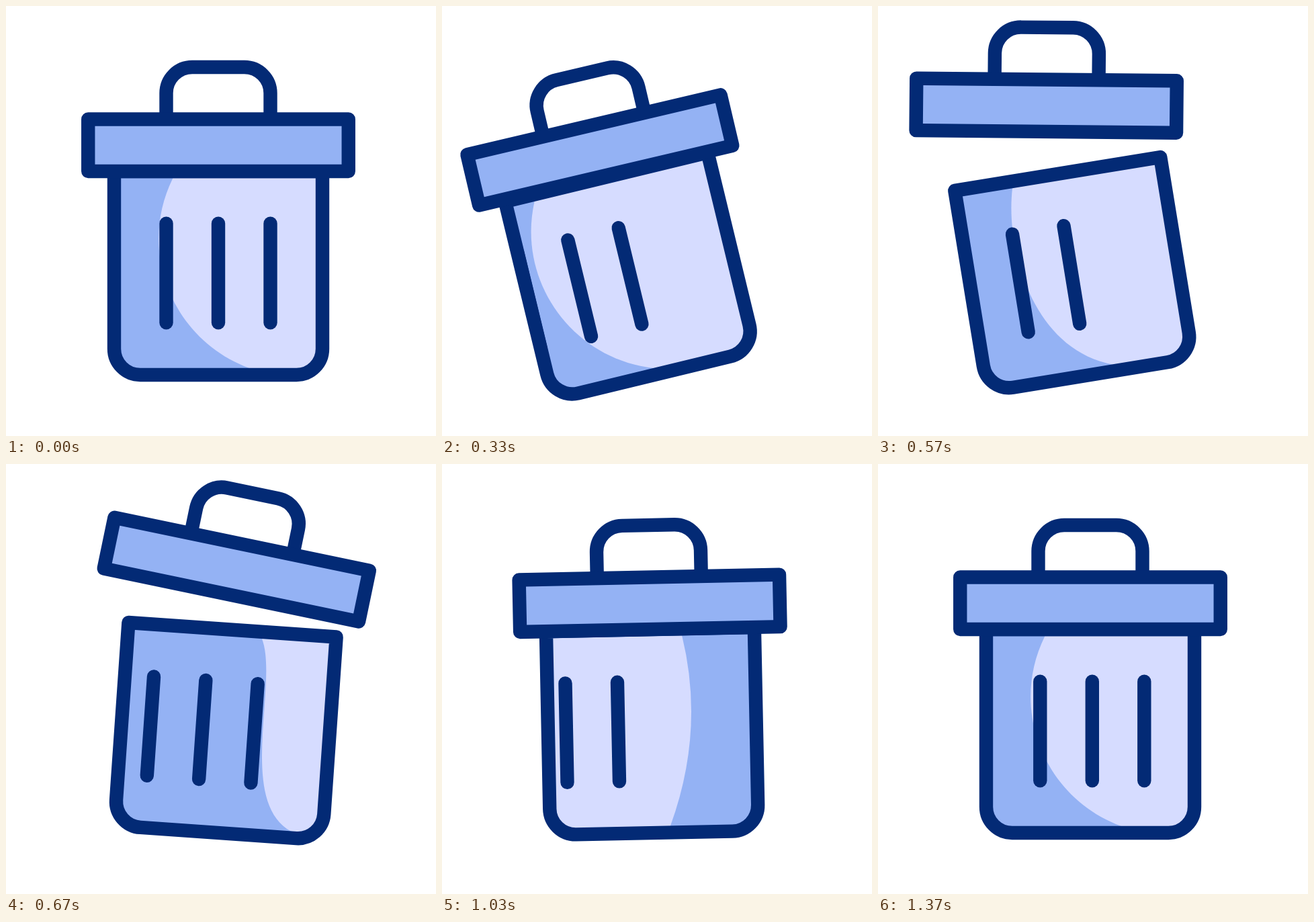
These frames come from a looping animation (640 px wide and 640 px high, 2 s). An HTML page with a canvas:

```html
<!DOCTYPE html>
<html lang="en">
<head>
<meta charset="utf-8">
<title>Trash can</title>
<style>
html, body { margin: 0; width: 100%; height: 100%; overflow: hidden; background: #fff; }
canvas { display: block; width: 640px; height: 640px; }
</style>
</head>
<body>
<canvas id="stage" width="640" height="640"></canvas>
<script>
const ctx = document.getElementById('stage').getContext('2d');
const NAVY = '#032a75', BLUE = '#94b2f4', PALE = '#d6dcff';
const LOOP = 2000, FPS = 30, LAST = 41;
const UNIT = 38.75, STROKE = 20.4;
const CX = 316, BASE = 549, RIM = 246, INNER_TOP = 257, INNER_BOTTOM = 539;
const LID_Y = RIM - UNIT;
const WRAP = UNIT * 10;

const clamp = v => Math.max(0, Math.min(1, v));
const lerp = (a, b, u) => a + (b - a) * u;
const smooth = u => u * u * (3 - 2 * u);
const progress = (n, from, to) => clamp((n - from) / (to - from));
const ease = (n, from, to) => smooth(progress(n, from, to));

// Ease with Bezier handles (x1, 0) and (x2, 1).
function bezierEase(x, x1, x2) {
  let lo = 0, hi = 1;
  for (let i = 0; i < 24; i++) {
    const t = (lo + hi) / 2, r = 1 - t;
    if (3 * r * r * t * x1 + 3 * r * t * t * x2 + t * t * t < x) lo = t; else hi = t;
  }
  return smooth(lo);
}

const SWING = [[0, 0], [14, -17], [22.2, 8.5], [27.7, -3.6], [35, 2.1], [41, 0]];

function swing(n) {
  const i = Math.max(1, SWING.findIndex(k => k[0] >= n));
  const [a, b] = [SWING[i - 1], SWING[i]];
  return lerp(a[1], b[1], ease(n, a[0], b[0])) * Math.PI / 180;
}

const lidOpen = n => ease(n, 9, 17.5) * (1 - ease(n, 18, 24.7));

function ribShift(n) {
  if (n < 14) return -97 * ease(n, 0, 14);
  return lerp(-97, WRAP + 2.8, bezierEase(progress(n, 14, LAST), 0.35, 0.59));
}

// Left edge of the highlight: x of four curve points, then y of the two handles.
const EDGE = [248, 194.6, 248, 362, 366, 497];
const EDGE_LEAVING = [
  [14, [192, 138.6, 192, 306, 366, 497]],
  [17, [246, 221, 238, 351, 346, 498]],
  [20, [361, 390, 340, 423.5, 320, 500]],
  [24, [541, 640, 490, 603, 320, 500]]
];
const moveEdge = d => EDGE.map((v, i) => i < 4 ? v + d : v);

function leavingEdge(n) {
  if (n <= 14) return moveEdge(-56 * ease(n, 0, 14));
  const i = Math.max(1, EDGE_LEAVING.findIndex(k => k[0] >= n));
  const [a, b] = [EDGE_LEAVING[i - 1], EDGE_LEAVING[i]];
  let u = progress(n, a[0], b[0]);
  if (i === 1) u *= u;
  return a[1].map((v, j) => lerp(v, b[1][j], u));
}

function fillHighlight(n) {
  if (n >= 24 && n < 26) return;
  const entering = n >= 26;
  const offset = entering ? -848 * (1 - ease(n, 14, LAST)) : 0;
  const [x0, x1, x2, x3, y1, y2] = entering ? moveEdge(offset) : leavingEdge(n);
  ctx.beginPath();
  ctx.moveTo(x0 + 10, INNER_TOP - 20);
  ctx.lineTo(x0, INNER_TOP);
  ctx.bezierCurveTo(x1, y1, x2, y2, x3, INNER_BOTTOM);
  ctx.lineTo(x3 + 30, INNER_BOTTOM + 10);
  if (entering) {
    const d = offset + 263;
    ctx.lineTo(337 + d, INNER_BOTTOM + 10);
    ctx.lineTo(340 + d, INNER_BOTTOM);
    ctx.quadraticCurveTo(394.5 + d, 398, 363 + d, INNER_TOP);
    ctx.lineTo(358 + d, INNER_TOP - 20);
  } else {
    ctx.lineTo(900, INNER_BOTTOM + 10);
    ctx.lineTo(900, INNER_TOP - 20);
  }
  ctx.fillStyle = PALE;
  ctx.fill();
}

function line(x, top, bottom) {
  ctx.beginPath();
  ctx.moveTo(x, top);
  ctx.lineTo(x, bottom);
  ctx.stroke();
}

function drawBody(n) {
  const body = new Path2D();
  body.roundRect(CX - 4 * UNIT, RIM, 8 * UNIT, BASE - RIM, [0, 0, UNIT, UNIT]);
  ctx.save();
  ctx.clip(body);
  ctx.fillStyle = BLUE;
  ctx.fill(body);
  fillHighlight(n);
  const shift = ribShift(n);
  for (const base of [shift, shift - WRAP])
    for (const slot of [-2, 0, 2]) line(CX + base + slot * UNIT, 323.7, 471.3);
  ctx.restore();
  ctx.stroke(body);
}

function drawLid(n) {
  const open = lidOpen(n);
  ctx.save();
  ctx.translate(CX, LID_Y - 65 * open);
  ctx.rotate(9.9 * open * Math.PI / 180);
  ctx.lineCap = 'butt';
  ctx.beginPath();
  ctx.moveTo(-2 * UNIT, -UNIT);
  ctx.arcTo(-2 * UNIT, -3 * UNIT, 0, -3 * UNIT, UNIT);
  ctx.arcTo(2 * UNIT, -3 * UNIT, 2 * UNIT, -UNIT, UNIT);
  ctx.lineTo(2 * UNIT, -UNIT);
  ctx.stroke();
  ctx.beginPath();
  ctx.rect(-5 * UNIT, -UNIT, 10 * UNIT, 2 * UNIT);
  ctx.fillStyle = BLUE;
  ctx.fill();
  ctx.stroke();
  ctx.restore();
}

function draw(n) {
  ctx.fillStyle = '#fff';
  ctx.fillRect(0, 0, 640, 640);
  ctx.save();
  ctx.strokeStyle = NAVY;
  ctx.lineWidth = STROKE;
  ctx.lineJoin = ctx.lineCap = 'round';
  ctx.translate(CX, BASE);
  ctx.rotate(swing(n));
  ctx.translate(-CX, -BASE);
  drawBody(n);
  drawLid(n);
  ctx.restore();
}

const start = performance.now();
function tick() {
  const t = (performance.now() - start) % LOOP;
  draw(Math.min(LAST, Math.floor((t + 3.4) * FPS / 1000)));
  requestAnimationFrame(tick);
}
tick();
</script>
</body>
</html>
```
